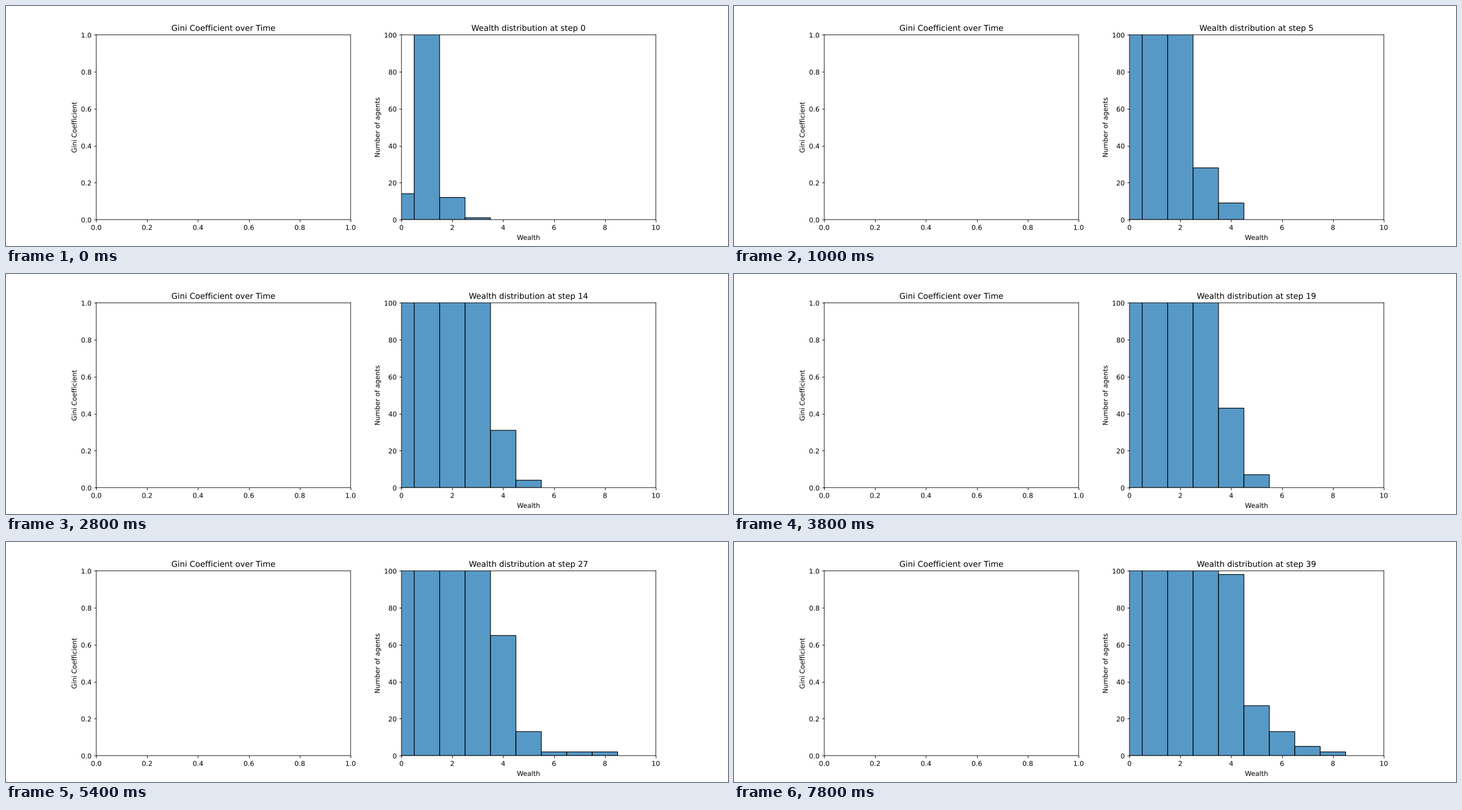
A matplotlib script that plays this animation: 1280x427 px, repeating every 8 s.

```python
import numpy as np
import matplotlib.pyplot as plt
from matplotlib.animation import FuncAnimation
from matplotlib.patheffects import Normal

# Text as outlines and no snapping: everything sits at fractional pixels.
plt.rcParams.update({
    "font.family": "DejaVu Sans",
    "path.snap": False,
    "path.effects": [Normal()],
})

DPI = 256 / 3
STEPS = 40
STEP_MS = 200


def stay(step, first, last):
    """Steps spent so far in a visit from first to last."""
    return np.clip(step - first + 1, 0, last - first + 1)


def counts(step):
    """Running number of agents seen at each wealth, 0 upwards."""
    return np.floor([
        14 + 28 * step,
        173 + 35 * step,
        12 + 22 * step,
        1 + 3.18 * step ** 1.33,
        1.6 * step ** 1.125,
        0.545 + 0.018 * step ** 2,
        # The richest agent climbs to 8 and falls back to 6.
        stay(step, 22, 23) + 1.25 * stay(step, 31, STEPS - 1),
        stay(step, 24, 25) + stay(step, 28, 30),
        stay(step, 26, 27),
    ])


fig, (gini_ax, wealth_ax) = plt.subplots(
    1, 2, figsize=(15, 427 / DPI), dpi=DPI, facecolor="white")
fig.subplots_adjust(left=0.125, right=0.9, bottom=0.11, top=0.88, wspace=0.2)

gini_ax.set(title="Gini Coefficient over Time", ylabel="Gini Coefficient",
            xlim=(0, 1), ylim=(0, 1))

start = counts(0)
bars = wealth_ax.bar(range(len(start)), start, width=1,
                     facecolor=("tab:blue", 0.75),
                     edgecolor="black", linewidth=1)
wealth_ax.set(xlabel="Wealth", ylabel="Number of agents",
              xlim=(0, 10), ylim=(0, 100))
title = wealth_ax.set_title("")


def update(step):
    for bar, height in zip(bars, counts(step)):
        bar.set_height(height)
        bar.set_visible(height > 0)
    title.set_text(f"Wealth distribution at step {step}")
    return [*bars, title]


anim = FuncAnimation(fig, update, frames=STEPS, interval=STEP_MS,
                     init_func=lambda: update(0), repeat=True, blit=False)
plt.show()
```
